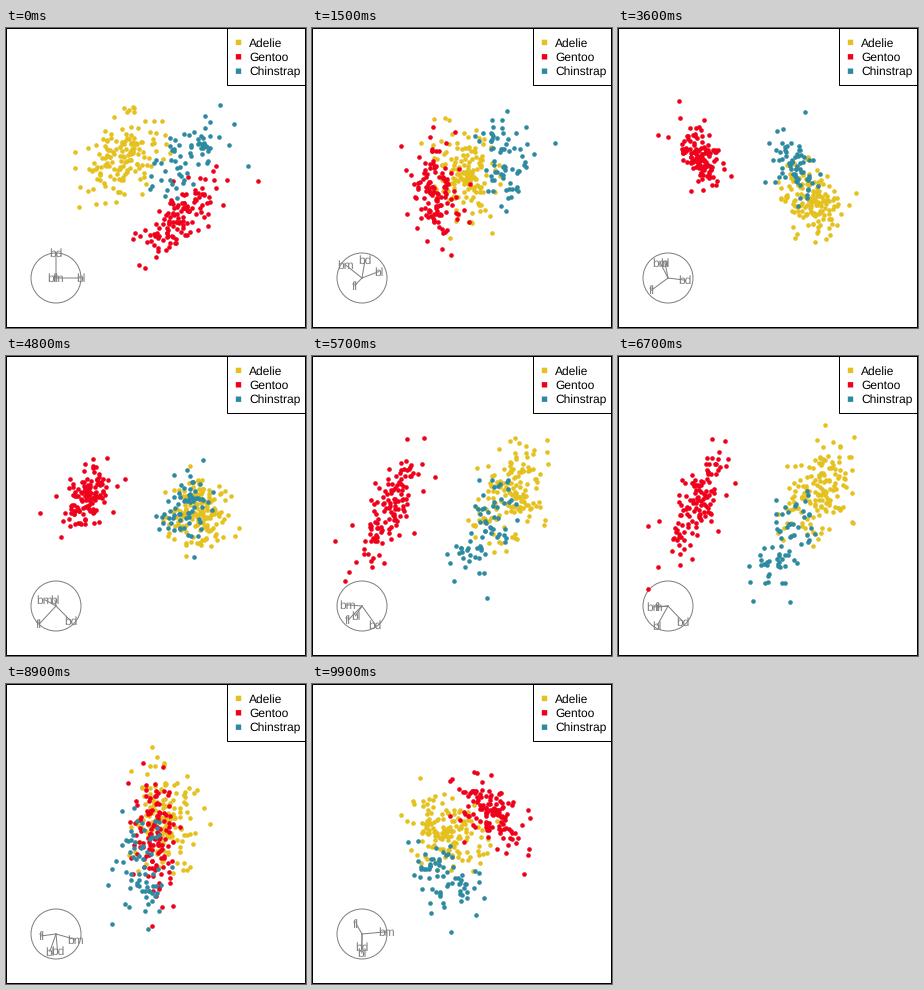
A matplotlib script for the animation above (10000 ms loop, 300x300 px).

```python
import numpy as np
import matplotlib.pyplot as plt
from matplotlib.animation import FuncAnimation
from matplotlib.patches import Circle, Rectangle

SIZE, DPI = 300, 100
PX = 72 / DPI            # points per pixel
FRAMES, STEP = 100, 100  # count, ms
UNIT = 35.5              # pixels per standard deviation
HUB, REACH = np.array([50, 250]), 25
GREY = "#7f7f7f"
FLIP = np.array([1, -1])
VARS = ["bl", "bd", "fl", "bm"]
SPREAD = np.array([.54, .57, .47, .57])  # within a species, per variable

plt.rcParams.update({"font.family": "Liberation Sans", "text.hinting": "none"})
rng = np.random.default_rng(11)

# name, colour, count, correlation, centre, farthest bird
SPECIES = [
    ("Adelie", "#e4c11f", 151, .45,
     [-.94, .61, -.78, -.63], [-2.16, -.83, -.92, -1.44]),
    ("Gentoo", "#f0001a", 123, .68,
     [.66, -1.10, 1.16, 1.09], [2.87, -.08, 2.07, 2.30]),
    ("Chinstrap", "#2e8aa0", 68, .58,
     [.90, .64, -.36, -.58], [2.58, .33, -1.42, -.63]),
]

# seconds, horizontal and vertical share of each variable
KEYS = [
    (0.0, [1, 0, 0, 0], [0, 1, 0, 0]),
    (1.5, [.68, .12, -.28, -.68], [.24, .72, -.28, .52]),
    (2.7, [.22, .38, -.84, -.34], [.70, .12, -.18, .67]),
    (3.6, [-.12, .68, -.68, -.32], [.60, -.08, -.48, .60]),
    (4.8, [-.04, .60, -.68, -.44], [.24, -.60, -.72, .24]),
    (6.7, [-.44, .60, -.40, -.56], [-.80, -.64, -.04, -.04]),
    (8.0, [-.36, .24, -.76, .50], [-.56, -.68, -.28, -.40]),
    (9.9, [0, 0, -.24, 1], [-.76, -.50, .40, .08]),
]


def cloud(count, corr, centre, far):
    """Birds sharing one size factor, so all variables correlate equally."""
    size = rng.standard_normal((count - 1, 1))
    own = rng.standard_normal((count - 1, 4))
    z = np.sqrt(corr) * size + np.sqrt(1 - corr) * own
    z = (z - z.mean(0)) / z.std(0)
    z = np.clip(z, -2.5, 2.5)
    return np.vstack([centre + SPREAD * z, far])


def orthonormal(m):
    u, _, v = np.linalg.svd(m, full_matrices=False)
    return u @ v


TIMES = np.array([k[0] for k in KEYS])
BASES = np.array([orthonormal(np.array(k[1:]).T) for k in KEYS])
SLOPES = np.gradient(BASES, TIMES, axis=0)


def basis(t):
    """4x2 projection at t seconds, a smooth path through the key planes."""
    i = min(np.searchsorted(TIMES, t, side="right") - 1, len(TIMES) - 2)
    h = TIMES[i + 1] - TIMES[i]
    s = (t - TIMES[i]) / h
    m = ((1 + 2 * s) * (1 - s) ** 2 * BASES[i]
         + s * (1 - s) ** 2 * h * SLOPES[i]
         + s * s * (3 - 2 * s) * BASES[i + 1]
         + s * s * (s - 1) * h * SLOPES[i + 1])
    return orthonormal(m)


fig = plt.figure(figsize=(SIZE / DPI, SIZE / DPI), dpi=DPI, facecolor="white")
ax = fig.add_axes([0, 0, 1, 1])
ax.set(xlim=(0, SIZE), ylim=(SIZE, 0))
ax.axis("off")


def text(x, y, s, **kw):
    return ax.text(x, y + 4.2, s, fontsize=12 * PX, va="baseline", **kw)


def box(x, y, w, h, **kw):
    ax.add_patch(Rectangle((x, y), w, h, snap=False, **kw))


def plot(style, color, **kw):
    line, = ax.plot([], [], style, color=color, lw=PX, snap=False, **kw)
    return line


# axis wheel
ax.add_patch(Circle(HUB, REACH, fill=False, ec=GREY, lw=PX, zorder=1))
spokes = [plot("-", GREY, zorder=1) for _ in VARS]
labels = [text(0, 0, v, color=GREY, ha="center", zorder=1.5) for v in VARS]

# points, legend and frame
box(221.5, 0.5, 78, 57, fc="white", ec="black", lw=PX, zorder=6)
groups = []
for n, (name, color, *stats) in enumerate(SPECIES):
    dots = plot("o", color, ms=4.6 * PX, mew=0, zorder=2 + n)
    groups.append((dots, cloud(*stats)))
    y = 14.4 * (n + 1)
    box(229.8, y - 2.7, 5.4, 5.4, fc=color, lw=0, zorder=7)
    text(243, y, name, color="black", zorder=7)
box(0.5, 0.5, SIZE - 1, SIZE - 1, fill=False, ec="black", lw=PX, zorder=8)


def draw(frame):
    plane = basis(frame * STEP / 1000)
    for dots, data in groups:
        dots.set_data(*(SIZE / 2 + UNIT * FLIP * (data @ plane)).T)
    tips = HUB + REACH * FLIP * plane
    for spoke, label, (x, y) in zip(spokes, labels, tips):
        spoke.set_data([HUB[0], x], [HUB[1], y])
        label.set_position((x, y + 4.2))
    return [g[0] for g in groups] + spokes + labels


anim = FuncAnimation(fig, draw, frames=FRAMES, interval=STEP, repeat=True,
                     repeat_delay=0, blit=False)
plt.show()
```
